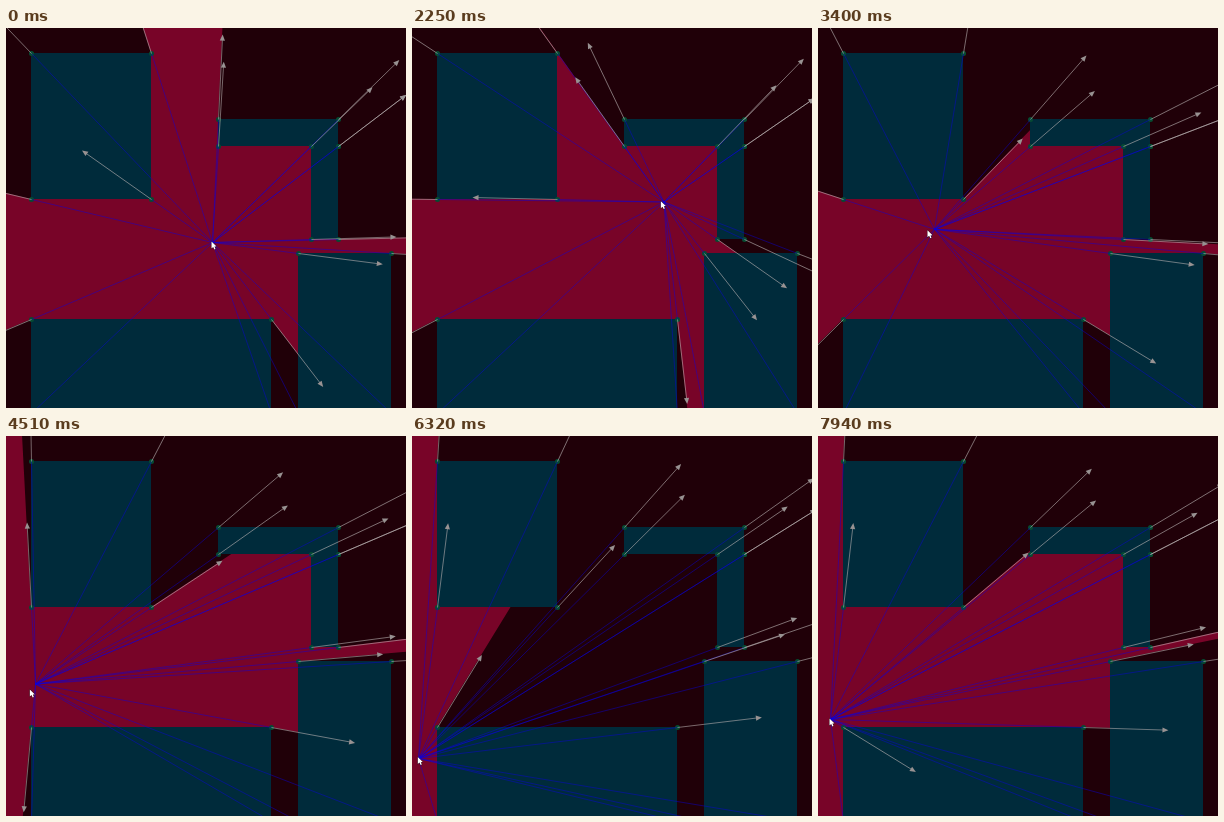
An HTML page with a canvas for the animation above (8 s loop, 400x380 px).

```html
<!DOCTYPE html>
<html lang="en">
<head>
<meta charset="utf-8">
<title>Light and shadow</title>
<style>
  html, body { margin: 0; width: 100%; height: 100%; overflow: hidden; background: #200008; }
  canvas { display: block; }
</style>
</head>
<body>
<canvas id="stage" width="400" height="380"></canvas>
<script>
const ctx = document.getElementById('stage').getContext('2d');
const LOOP = 8000, START = 360, STEP = 64.6, ARROW = 85, FAR = 1000, CELL = 40 / 3;

// Boxes on a square grid: left, top, right, bottom in cells, as clockwise corners
const gridX = n => Math.round(25.3 + n * CELL), gridY = n => Math.round(24.7 + n * CELL);
const box = (l, t, r, b) =>
  [[l, t], [r, t], [r, b], [l, b]].map(([x, y]) => [gridX(x), gridY(y)]);
const boxes = [
  box(0, 0, 9, 11), box(14, 5, 23, 7), box(21, 7, 23, 14),
  box(0, 20, 18, 27), box(20, 15, 27, 27)
];
const corners = boxes.flat();

// Key points of the light: step, x, y
const path = [
  [0, 206, 214], [14, 263.3, 197.5], [29, 251.5, 173.5], [47, 116, 200.8], [64, 29, 247.5],
  [68, 14, 278], [92, 6, 322], [96, 8, 319], [101, 8, 319], [117, 12, 283]
];
const last = path.length - 1;

const slope = (i, d) => (path[i + 1][d] - path[i][d]) / (path[i + 1][0] - path[i][0]);

// Tangent of a monotone cubic through the key points
function tangent(i, d) {
  if (i === 0 || i === last) return 0;
  const a = slope(i - 1, d), b = slope(i, d);
  return a * b > 0 ? 2 * a * b / (a + b) : 0;
}

function lightAt(step) {
  step = Math.min(Math.max(step, 0), path[last][0]);
  const i = Math.max(path.findIndex(key => key[0] >= step) - 1, 0);
  const span = path[i + 1][0] - path[i][0], u = (step - path[i][0]) / span, v = 1 - u;
  return [1, 2].map(d =>
    path[i][d] * (1 + 2 * u) * v * v + path[i + 1][d] * (1 + 2 * v) * u * u +
    span * u * v * (tangent(i, d) * v - tangent(i + 1, d) * u));
}

function trace(points) {
  points.forEach(([x, y], i) => i ? ctx.lineTo(x, y) : ctx.moveTo(x, y));
  ctx.closePath();
}

function line(x1, y1, x2, y2) {
  ctx.beginPath();
  ctx.moveTo(x1, y1);
  ctx.lineTo(x2, y2);
  ctx.stroke();
}

// Every edge facing the light throws a shadow away from it
function drawShadows([px, py]) {
  const cast = ([x, y]) => [x + (x - px) * FAR, y + (y - py) * FAR];
  ctx.fillStyle = '#200008';
  ctx.beginPath();
  for (const shape of boxes) {
    shape.forEach((a, i) => {
      const b = shape[(i + 1) % shape.length];
      const side = (b[0] - a[0]) * (py - a[1]) - (b[1] - a[1]) * (px - a[0]);
      if (side < 0) trace([a, b, cast(b), cast(a)]);
    });
  }
  ctx.fill();
}

function drawArrow([x, y], [px, py]) {
  ctx.save();
  ctx.translate(x, y);
  ctx.rotate(Math.atan2(y - py, x - px));
  line(0, 0, ARROW - 5, 0);
  ctx.beginPath();
  trace([[ARROW, 0], [ARROW - 6, -2.6], [ARROW - 6, 2.6]]);
  ctx.fill();
  ctx.restore();
}

function drawCursor([x, y]) {
  ctx.save();
  ctx.translate(x - 0.5, y - 0.5);
  ctx.scale(0.88, 0.88);
  ctx.beginPath();
  trace([[0, 0], [0, 8], [1.9, 6.3], [3.2, 9], [4.6, 8.4], [3.4, 5.8], [5.7, 5.6]]);
  ctx.lineWidth = 1;
  ctx.strokeStyle = 'rgba(0,0,0,.6)';
  ctx.stroke();
  ctx.fillStyle = '#fff';
  ctx.fill();
  ctx.restore();
}

function draw(time) {
  const step = Math.floor((time % LOOP - START) / STEP);
  const light = lightAt(step);

  ctx.fillStyle = '#780428';
  ctx.fillRect(0, 0, 400, 380);
  drawShadows(light);

  ctx.fillStyle = '#002b3b';
  ctx.beginPath();
  boxes.forEach(trace);
  ctx.fill();

  ctx.save();
  ctx.translate(0.5, 0.5);
  ctx.fillStyle = '#064b32';
  for (const [x, y] of corners) {
    ctx.beginPath();
    ctx.arc(x, y, 2.5, 0, 7);
    ctx.fill();
  }

  ctx.lineWidth = 0.9;
  ctx.strokeStyle = 'rgba(10,0,225,.5)';
  for (const corner of corners) line(...light, ...corner);

  ctx.lineWidth = 0.8;
  ctx.strokeStyle = 'rgba(185,178,178,.7)';
  ctx.fillStyle = '#989292';
  for (const corner of corners) drawArrow(corner, light);
  ctx.restore();

  // The pointer runs one step ahead of the light
  drawCursor(lightAt(step + 1));
  requestAnimationFrame(() => draw(performance.now() - begin));
}

const begin = performance.now();
draw(0);
</script>
</body>
</html>
```
